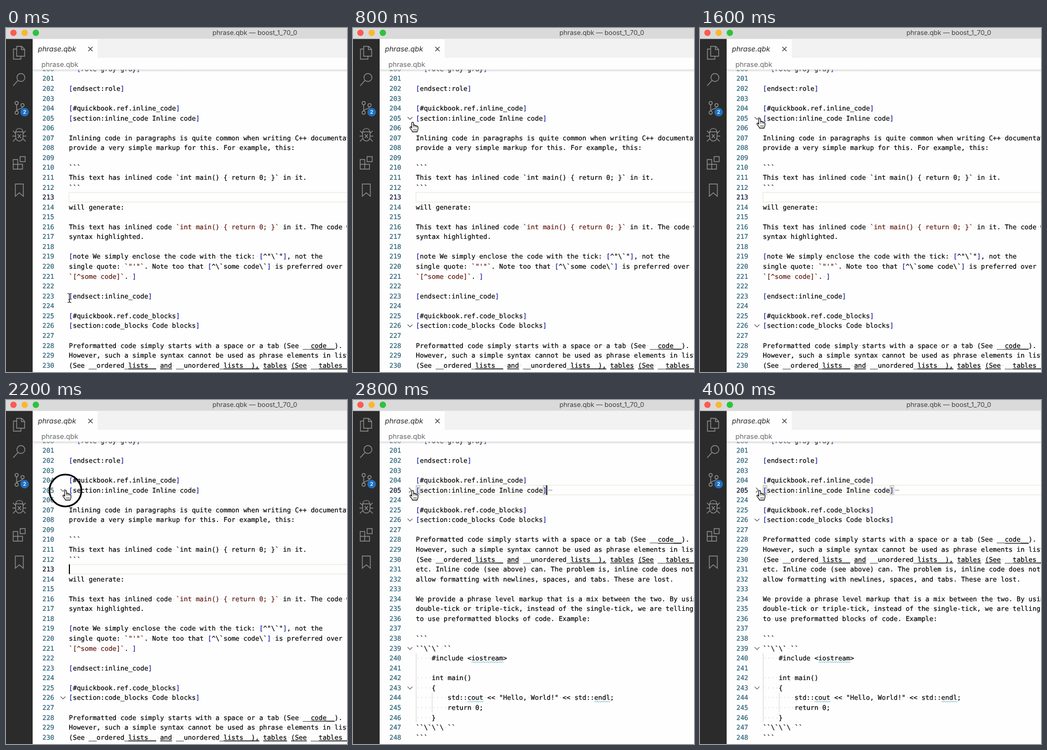
Write an HTML page that moves like this. It is 640 by 646 pixels and loops after 4200 ms.

```html
<!DOCTYPE html>
<html lang="en">
<head>
<meta charset="utf-8">
<title>Folding a section</title>
<style>
html, body { margin: 0; width: 100%; height: 100%; overflow: hidden; background: #fefefe; }
svg { display: block; width: 640px; height: 646px; }
text { white-space: pre; text-rendering: geometricPrecision; }
.code text { font: 12.37px "DejaVu Sans Mono", "Liberation Mono", monospace; color: #050505; }
.code text, .code tspan { fill: currentColor; stroke: currentColor; stroke-width: .22; }
.code .num { color: #2c6478; }
.code .now { color: #0b1530; }
.code .dots { color: #dadad4; stroke: none; }
.code .br { color: #1420a4; }
.code .str { color: #601a12; }
.ui { font-family: Inter, "Open Sans", sans-serif; }
.icons { fill: none; stroke: #8f8f8d; stroke-width: 1.4; }
.fold { fill: none; stroke: #5c5c5c; stroke-width: 1.2; }
.link { stroke: #050505; stroke-width: 1.3; }
.wave { fill: none; stroke: #55aecb; stroke-width: 1; }
.guide { stroke: #d3d3d0; stroke-width: 1; }
.line { fill: none; stroke: #eeeee2; stroke-width: 1.6; }
.match { fill: #eceee6; stroke: #b4b4b0; stroke-width: 1; }
</style>
</head>
<body>
<svg id="stage" viewBox="0 0 640 646" xmlns="http://www.w3.org/2000/svg">
  <defs>
    <clipPath id="pane"><rect x="50" y="78" width="590" height="568"/></clipPath>
    <linearGradient id="shade" x2="0" y2="1">
      <stop stop-color="#ccc" stop-opacity=".7"/>
      <stop offset="1" stop-color="#ccc" stop-opacity="0"/>
    </linearGradient>
  </defs>
  <rect width="640" height="646" fill="#fefefe"/>

  <g class="code" clip-path="url(#pane)">
    <g id="open"></g>
    <g id="folded"></g>
  </g>
  <rect x="50" y="78" width="590" height="5" fill="url(#shade)"/>
  <rect id="caret" width="2" height="18" fill="#000"/>

  <rect width="640" height="20.5" fill="#dadada"/>
  <rect x="172" y="20.5" width="468" height="35.5" fill="#f2f2f2"/>
  <circle cx="14" cy="9" r="6" fill="#fb5b50"/>
  <circle cx="35" cy="9" r="6" fill="#f9b830"/>
  <circle cx="56" cy="9" r="6" fill="#2cc33e"/>
  <g class="ui">
    <text x="467" y="13.3" font-size="12.3" text-anchor="middle" fill="#404040">phrase.qbk — boost_1_70_0</text>
    <text x="60" y="44.4" font-size="13.4" font-style="italic" fill="#2a2a2a">phrase.qbk</text>
    <text x="66.5" y="73.4" font-size="13" fill="#666">phrase.qbk</text>
  </g>
  <path d="M154.5 35.5l8 8m0-8l-8 8" stroke="#383838" stroke-width="1.2"/>

  <rect y="20.5" width="50" height="625.5" fill="#2b2b2b"/>
  <g class="icons">
    <path d="M20 39.500H14V58.500H28V53M20 34.500H29.500L35 40V53H20ZM29 35V40.500H35"/>
    <circle cx="28" cy="93" r="7.500"/>
    <path d="M22.500 98.500L13.500 108.500"/>
    <circle cx="20" cy="141" r="3"/><circle cx="31" cy="145" r="3"/><circle cx="20" cy="159" r="3"/>
    <path d="M20 144V156M31 148C31 153 21 151 20 156"/>
    <path d="M18.500 195C18.500 186.500 31.500 186.500 31.500 195ZM18 195H32V204C32 215 18 215 18 204ZM18 198L13 193M32 198L37 193M18 203H12M32 203H38M18 208L13 213M32 208L37 213M22 199.500L28 206.500M28 199.500L22 206.500"/>
    <path d="M13.500 247H22V265H13.500ZM13.500 256H31V265H22M26.500 241.500H36V251H26.500Z"/>
    <path d="M17.500 293H32.500V316L25 309.500L17.500 316Z"/>
  </g>
  <circle cx="35" cy="158" r="8" fill="#1f6fc0"/>
  <text class="ui" x="35" y="161.300" font-size="9.500" font-weight="600" text-anchor="middle" fill="#fff">2</text>

  <circle id="ring" cx="111.500" cy="170" r="30" fill="none" stroke="#050505" stroke-width="3.200"/>
  <g id="beam" fill="none">
    <path id="bar" d="M-3.500-8.500Q0-8.500 0-6Q0-8.500 3.500-8.500M0-6V6M-3.500 8.500Q0 8.500 0 6Q0 8.500 3.500 8.500M-2 3H2" stroke="#fff" stroke-width="2.600"/>
    <path d="M-3.500-8.500Q0-8.500 0-6Q0-8.500 3.500-8.500M0-6V6M-3.500 8.500Q0 8.500 0 6Q0 8.500 3.500 8.500M-2 3H2" stroke="#111" stroke-width="1.200"/>
  </g>
  <g id="hand">
    <path d="M-1.700 1.500C-1.700-.8 1.600-.8 1.700 1.500V6C2.300 4.800 4.600 5 4.700 6.600C5.500 5.700 7.400 6 7.500 7.600C8.500 6.900 10 7.400 10 9.200V12.500C10 14.500 8.600 15.500 8.400 18H-.2C-.7 15.500-3.500 13.500-5 10.700C-6 8.800-3.700 7.700-2.600 9.500L-1.700 10.700Z" fill="#fff" stroke="#111" stroke-width="1.300" stroke-linejoin="round"/>
    <path d="M1.700 6V9.500M4.700 7V9.800M7.500 8V10.200M2 12.500V15.500M4.300 12.500V15.500M6.600 12.500V15.500" stroke="#111" stroke-width=".9" fill="none"/>
  </g>
</svg>
<script>
const NS = "http://www.w3.org/2000/svg";
const LEFT = 118, CHAR = 7.447, BASE = 99.4, ROW = 18.56;
const $ = id => document.getElementById(id);

const LINES = String.raw`  [role gray gray]

[endsect:role]

[#quickbook.ref.inline_code]
[section:inline_code Inline code]

Inlining code in paragraphs is quite common when writing C++ documentation.
provide a very simple markup for this. For example, this:

~~~
This text has inlined code ~int main() { return 0; }~ in it.
~~~

will generate:

This text has inlined code ~int main() { return 0; }~ in it. The code will be
syntax highlighted.

[note We simply enclose the code with the tick: [^"\~"], not the
single quote: ~"'"~. Note too that [^\~some code\~] is preferred over
~[^some code]~. ]

[endsect:inline_code]

[#quickbook.ref.code_blocks]
[section:code_blocks Code blocks]

Preformatted code simply starts with a space or a tab (See __code__).
However, such a simple syntax cannot be used as phrase elements in lists
(See __ordered_lists__ and __unordered_lists__), tables (See __tables__),
etc. Inline code (see above) can. The problem is, inline code does not
allow formatting with newlines, spaces, and tabs. These are lost.

We provide a phrase level markup that is a mix between the two. By using
double-tick or triple-tick, instead of the single-tick, we are telling
to use preformatted blocks of code. Example:

~~~
~~\~\~ ~~
    #include <iostream>

    int main()
    {
        std::cout << "Hello, World!" << std::endl;
        return 0;
    }
~~\~\~\ ~~
~~~`.replace(/~/g, "`").split("\n");

const FIRST = 200;
const QUOTED = [216, 220, 221];
const LINKS = { 228: /code__/g, 230: /lists__\)?,?|and|tables(__)?|\(See(?= __t)/g };
const WAVES = { 240: /iostream/g, 244: /cout|endl/g };

function add(parent, tag, attrs, content) {
  const el = document.createElementNS(NS, tag);
  for (const k in attrs) el.setAttribute(k, attrs[k]);
  if (content !== undefined) el.textContent = content;
  return parent.appendChild(el);
}

const xAt = col => LEFT + col * CHAR;

function drawText(g, n, text, y) {
  const dots = text.replace(/[^ ]/g, "\u00a0").replace(/ /g, "·");
  add(g, "text", { x: LEFT, y, class: "dots" }, dots);
  const row = add(g, "text", { x: LEFT, y });
  const quoted = QUOTED.includes(n);
  const parts = text.split(quoted ? /((?<!\\)`[^`]*`|[[\]])/ : /([[\]])/);
  for (const p of parts) {
    if (!p) continue;
    const kind = /^[[\]]$/.test(p) ? "br" : quoted && /^`.*`$/.test(p) ? "str" : "";
    add(row, "tspan", { class: kind }, p);
  }
}

function wave(x0, x1, y) {
  let d = `M${x0} ${y}`;
  for (let x = x0, up = true; x < x1; x += 2, up = !up) d += `l2 ${up ? -2 : 2}`;
  return d;
}

function chevron(g, y, shut) {
  const d = shut ? `M105 ${y - 4.5}l4.500 4.500l-4.500 4.500` : `M102.500 ${y - 2}l4.500 4.500l4.500-4.500`;
  return add(g, "path", { class: "fold", d });
}

function drawView(g, numbers, current) {
  const marks = add(g, "g", { class: "marks" });
  const folds = add(g, "g", {});
  numbers.forEach((n, i) => {
    const y = BASE + (i - 1) * ROW, mid = y - 4.4;
    const text = LINES[n - FIRST];
    if (n === current)
      add(marks, "rect", { class: "line", x: LEFT + .3, y: mid - 9, width: 540, height: 18 });
    add(g, "text", { x: 68.2, y, class: n === current ? "now" : "num" }, n);
    if (text) drawText(g, n, text, y);
    for (const m of text.matchAll(LINKS[n] || /$^./g))
      add(g, "line", { class: "link", x1: xAt(m.index), x2: xAt(m.index + m[0].length), y1: y + 2.6, y2: y + 2.6 });
    for (const m of text.matchAll(WAVES[n] || /$^./g))
      add(g, "path", { class: "wave", d: wave(xAt(m.index), xAt(m.index + m[0].length), y + 4) });
    if (n >= 240 && n <= 246)
      add(g, "line", { class: "guide", x1: 118.5, x2: 118.5, y1: mid - 9.3, y2: mid + 9.3 });
    if (n === 244 || n === 245)
      add(g, "line", { class: "guide", x1: 148.5, x2: 148.5, y1: mid - 9.3, y2: mid + 9.3 });
    if ([205, 226, 239, 243].includes(n)) chevron(folds, mid, n === current);
  });
  return { marks, folds };
}

const range = (a, b) => Array.from({ length: b - a + 1 }, (_, i) => a + i);
const openView = drawView($("open"), range(200, 230), 213);
const foldedView = drawView($("folded"), [...range(200, 205), ...range(224, 248)], 205);

const sectionMid = BASE + 4 * ROW - 4.4;
const match = add(foldedView.marks, "g", {});
for (const col of [0, 32])
  add(match, "rect", { class: "match", x: xAt(col) + .5, y: sectionMid - 8.5, width: 7, height: 17 });
for (const x of [367.5, 370.2, 372.9])
  add($("folded"), "circle", { cx: x, cy: sectionMid + .2, r: .9, fill: "#707070" });

// time, x, y of the pointer
const PATH = [
  [0, 119, 507], [200, 119, 490], [400, 119, 385], [600, 118.5, 245],
  [800, 112, 177], [1000, 112, 173], [1200, 112, 170]
];
const LOOP = 4200, STEP = 200, FOLD = 2400;

const show = (el, on) => el.setAttribute("visibility", on ? "visible" : "hidden");
const place = (el, x, y) => el.setAttribute("transform", `translate(${x} ${y})`);

function render(time) {
  const t = Math.floor((time % LOOP) / STEP) * STEP;
  const folded = t >= FOLD, overFold = t >= 800;
  $("open").style.display = folded ? "none" : "";
  $("folded").style.display = folded ? "" : "none";
  show(openView.folds, overFold);
  show(match, t >= 2600);

  const [, x, y] = PATH.findLast(p => p[0] <= t);
  place($("beam"), x, y);
  place($("hand"), x, y);
  show($("beam"), !overFold);
  show($("hand"), overFold);
  show($("ring"), t === 2200);

  const lit = folded ? (t - FOLD) % 1000 < 500 : t % 1000 > 100 && t % 1000 < 600;
  show($("caret"), lit);
  $("caret").setAttribute("x", folded ? 362.5 : 118);
  $("caret").setAttribute("y", folded ? sectionMid - 9 : BASE + 12 * ROW - 13.4);
}

const start = performance.now();
function tick() {
  render(performance.now() - start);
  requestAnimationFrame(tick);
}
tick();
</script>
</body>
</html>
```
